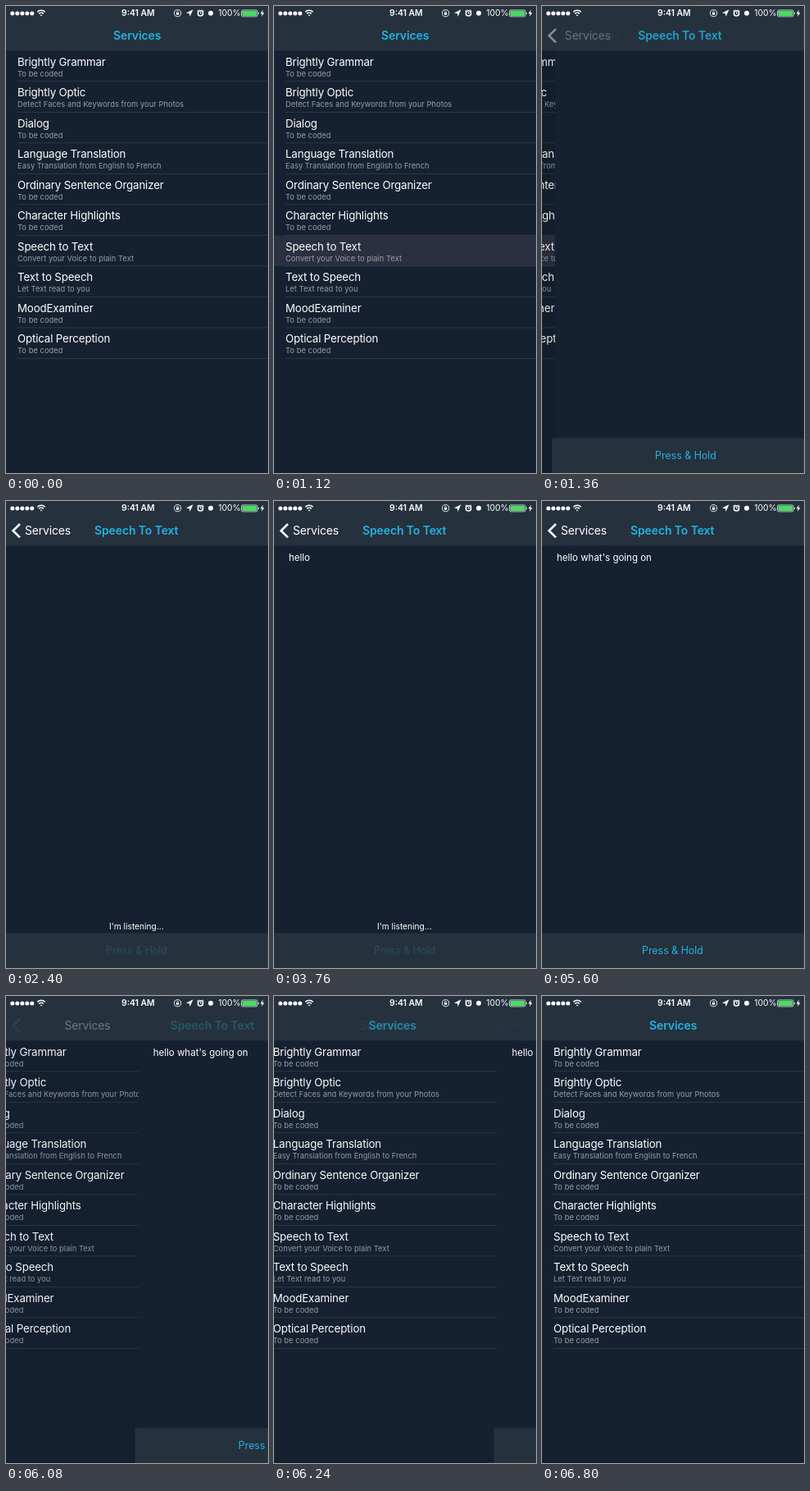
An HTML page for the animation above (7.12 s loop, 320 by 569 pixels).

```html
<!DOCTYPE html>
<html lang="en">
<head>
<meta charset="utf-8">
<title>Services</title>
<style>
html, body { margin: 0; width: 100%; height: 100%; overflow: hidden; background: #152131; }
svg { display: block; width: 320px; height: 569px; font-family: Inter, Roboto, sans-serif; fill: #fff; }
.bar { fill: #26313e; }
.cyan { fill: #20b3de; }
.title { font-size: 14px; font-weight: 600; letter-spacing: -.12px; }
.back { font-size: 14px; letter-spacing: -.17px; }
.name { font-size: 13.3px; letter-spacing: -.15px; }
.note { font-size: 9.3px; letter-spacing: .055px; fill: #989ea3; }
.status { font-size: 10.4px; }
.line { fill: none; stroke: #fff; }
</style>
</head>
<body>
<svg viewBox="0 0 320 569">
  <g id="list"></g>
  <rect id="shade" y="54.5" width="320" height="515" fill="#000"/>

  <g id="detail">
    <rect y="54.5" width="320" height="515" fill="#152131"/>
    <rect class="bar" x="-4" y="526.5" width="324" height="43"/>
    <text id="heard" x="18" y="73" font-size="11.5"></text>
    <text id="hint" x="126" y="522" font-size="10.2">I'm listening...</text>
    <text id="press" class="cyan" x="122" y="552.3" font-size="12.4">Press &amp; Hold</text>
  </g>

  <rect class="bar" width="320" height="54.5"/>
  <path id="chevron" class="line" d="M17 28 8.6 36.2 17 44.4" stroke-width="2.6"/>
  <text id="back" class="back" y="41.2">Services</text>
  <text id="listTitle" class="title cyan" y="41.2">Services</text>
  <text id="detailTitle" class="title cyan" y="41.2">Speech To Text</text>

  <g id="dots"></g>
  <g class="line" stroke-width="1.5">
    <path d="M38.3 7.3a6.6 6.6 0 0 1 9.4 0M40.2 9.4a4 4 0 0 1 5.6 0"/>
    <path d="M43 12.6l-1.4-1.6a2.2 2.2 0 0 1 2.8 0z" fill="#fff" stroke="none"/>
  </g>
  <text class="status" x="141" y="12.4" font-weight="600">9:41 AM</text>
  <g class="line" stroke-width="1">
    <circle cx="209.6" cy="8.7" r="4.1" stroke-width=".9"/>
    <path d="M208.6 8.4V7.4a1 1 0 0 1 2 0v1" stroke-width=".7"/>
    <rect x="207.9" y="8.2" width="3.4" height="2.5" fill="#fff" stroke="none"/>
    <circle cx="237.5" cy="8.9" r="3.1" stroke-width="1.5"/>
    <path d="M237.5 7.2v1.9h1.4M233.5 6.3l1.8-1.8M241.5 6.3l-1.8-1.8"/>
    <rect x="287.5" y="4.9" width="19.6" height="8" rx="1.6" stroke-width=".7"/>
  </g>
  <path d="M228.5 4.3 224.6 13 224 9.2 220 8.5z"/>
  <circle cx="250" cy="8.7" r="3"/>
  <text class="status" x="259.2" y="12.4">100%</text>
  <rect x="288.4" y="5.8" width="17.8" height="6.2" rx=".8" fill="#4cd964"/>
  <path d="M307.8 7.4a1.6 1.6 0 0 1 0 3z"/>
  <path d="M314 4.6 310.6 9.3h2.2l-.9 3.7 3.6-4.8h-2.3z"/>
</svg>
<script>
const LOOP = 7120, STEP = 80, ROW = 37.52, TOP = 54.5;
const PUSH = 1140, POP = 5820;
const todo = 'To be coded';
const services = [
  ['Brightly Grammar', todo],
  ['Brightly Optic', 'Detect Faces and Keywords from your Photos'],
  ['Dialog', todo],
  ['Language Translation', 'Easy Translation from English to French'],
  ['Ordinary Sentence Organizer', todo],
  ['Character Highlights', todo],
  ['Speech to Text', 'Convert your Voice to plain Text'],
  ['Text to Speech', 'Let Text read to you'],
  ['MoodExaminer', todo],
  ['Optical Perception', todo]
];
const $ = id => document.getElementById(id);
const clamp = v => Math.min(1, Math.max(0, v));
const fade = (id, v) => $(id).setAttribute('opacity', clamp(v));
const moveX = (id, x) => $(id).setAttribute('transform', `translate(${x} 0)`);

$('list').innerHTML = `<rect id="picked" y="${TOP + 6 * ROW}" width="320" height="${ROW}" fill="#2a3040"/>` +
  services.map(([name, note], i) => {
    const y = TOP + i * ROW;
    return `<text class="name" x="14" y="${y + 18.2}">${name}</text>
      <text class="note" x="14" y="${y + 31.2}">${note}</text>
      <rect x="14" y="${y + ROW - .6}" width="306" height=".7" fill="#34414d"/>`;
  }).join('');
$('dots').innerHTML = [0, 1, 2, 3, 4].map(i => `<circle cx="${7.8 + i * 6}" cy="8.9" r="2.5"/>`).join('');

// shown: how far the detail screen is in; blend: progress of the bar's cross-fade
function transition(t) {
  if (t >= POP) {
    const left = 1 - Math.sin(clamp((t - POP) / 600) * Math.PI / 2) ** 1.5;
    return [left, left];
  }
  if (t < PUSH) return [0, 0];
  const k = 21.6 * (t - PUSH) / 1000;
  return [t > 1620 ? 1 : 1 - (1 + k) * Math.exp(-k), clamp((t - PUSH) / 460)];
}

function draw(t) {
  const [shown, blend] = transition(t), pop = t >= POP;

  moveX('list', -96 * shown);
  fade('shade', .1 * shown);
  fade('picked', t >= 1120 && t < 2000 ? 1 : 0);
  moveX('detail', 324 * (1 - shown));

  moveX('back', 23 + 97 * (1 - shown));
  moveX('listTitle', 131 - 97 * shown);
  moveX('detailTitle', 108 + 186 * (1 - shown));
  fade('back', blend ** 1.6);
  fade('chevron', blend ** (pop ? 4 : 1.1));
  fade('listTitle', 1 - 2 * blend);
  fade('detailTitle', blend ** (pop ? 1.8 : .2));

  const held = t >= 1920 && t < 5240;
  fade('press', held ? .2 + .8 * clamp((t - 4880) / 360) : 1);
  fade('hint', t >= 2320 && t < 5440 ? 1 : 0);
  $('heard').textContent = t < 3680 ? '' : t < 4000 ? 'hello' :
    t < 4320 ? "hello what's" : "hello what's going on";
}

const start = performance.now();
function tick() {
  const t = (performance.now() - start) % LOOP;
  draw(Math.floor(t / STEP) * STEP);
  requestAnimationFrame(tick);
}
tick();
</script>
</body>
</html>
```
